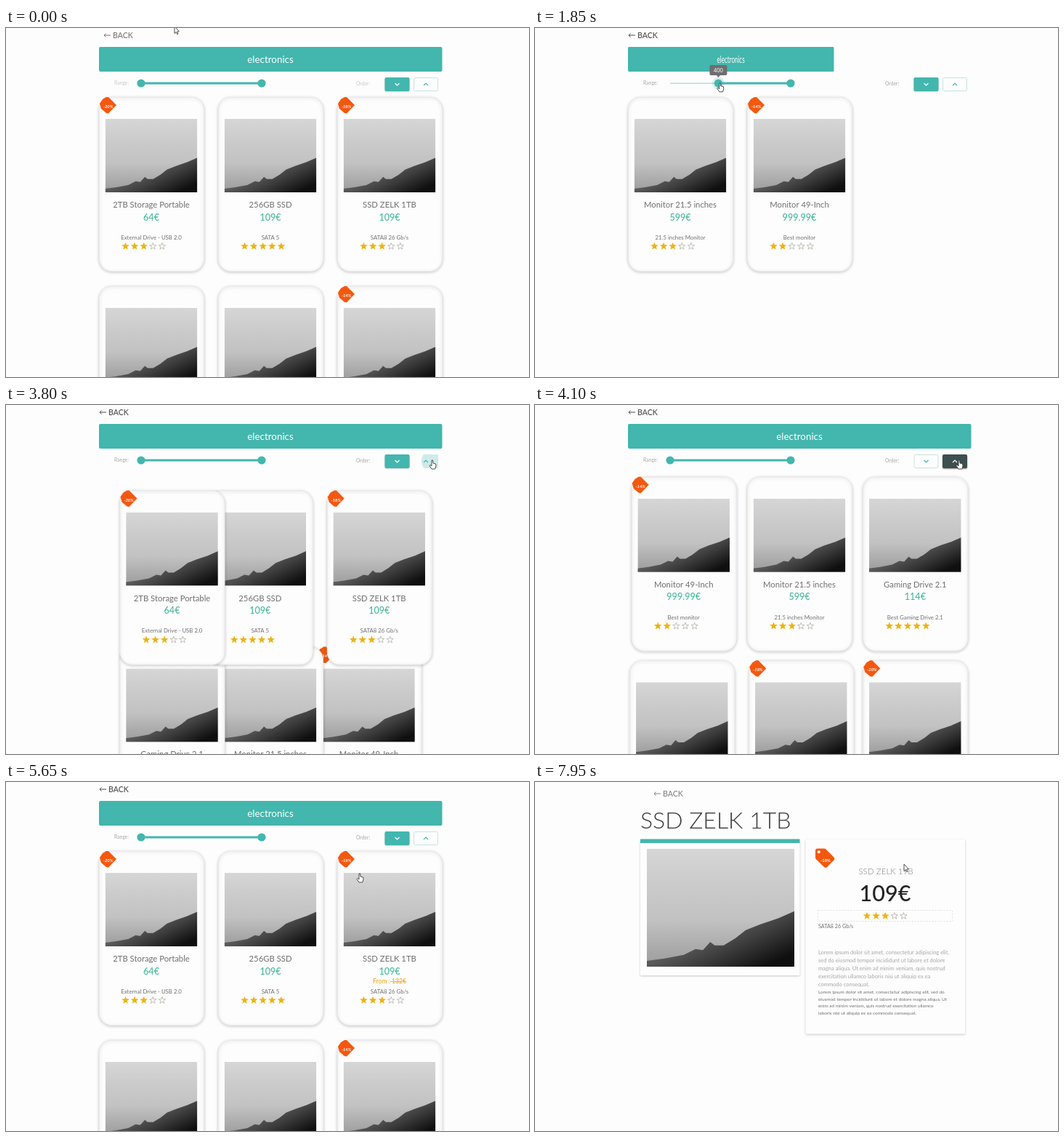
An HTML page with a canvas for the animation above (8 s loop, 720 by 480 pixels).

```html
<!DOCTYPE html>
<html lang="en">
<head>
<meta charset="utf-8">
<title>Shop list</title>
<style>
html, body { margin: 0; width: 100%; height: 100%; overflow: hidden; background: #fdfdfd; }
canvas { display: block; width: 720px; height: 480px; }
</style>
</head>
<body>
<canvas id="stage" width="720" height="480"></canvas>
<script>
const ctx = document.getElementById('stage').getContext('2d');
const LOOP = 8000;
const FONT = 'Lato, "Open Sans", sans-serif';
const BG = '#fdfdfd', TEAL = '#43b6ae', GREEN = '#45b99a', GOLD = '#edb313', ORANGE = '#f4580f';
const GREY = '#707070', DARK = '#4c4c4c', PALE = '#a6a6a6';

const items = {
  drive: { name: '2TB Storage Portable', price: '64€', note: 'External Drive - USB 2.0', stars: 3, off: '-20%' },
  ssd: { name: '256GB SSD', price: '109€', note: 'SATA 5', stars: 5 },
  plus: { name: 'SSD ZELK 1TB', price: '109€', note: 'SATA8 26 Gb/s', stars: 3, off: '-18%' },
  gaming: { name: 'Gaming Drive 2.1', price: '114€', note: 'Best Gaming Drive 2.1', stars: 5 },
  small: { name: 'Monitor 21.5 inches', price: '599€', note: '21.5 inches Monitor', stars: 3 },
  wide: { name: 'Monitor 49-Inch', price: '999.99€', note: 'Best monitor', stars: 2, off: '-14%' }
};
const rising = ['drive', 'ssd', 'plus', 'gaming', 'small', 'wide'];
const falling = ['wide', 'small', 'gaming', 'ssd', 'plus', 'drive'];
const phases = [
  { at: -1000, list: rising },
  { at: 1128, list: ['small', 'wide'] },
  { at: 2660, list: rising },
  { at: 3729, list: falling },
  { at: 4950, list: rising }
];

// Pointer tip: time, x, y
const route = [
  [0, 232, -2], [200, 228, 8], [650, 186, 72], [820, 186, 74], [1080, 255, 77], [1250, 257, 78], [2150, 254, 75],
  [2300, 252, 74], [2570, 182, 72], [2800, 181, 72], [3450, 576, 75], [3700, 587, 76], [3800, 587, 76],
  [4100, 584, 76], [4500, 580, 76], [4750, 540, 76], [5000, 539, 77], [5550, 488, 122], [5650, 487, 126],
  [6250, 487, 128], [7100, 496, 122], [7950, 508, 113]
];

const clamp = v => Math.max(0, Math.min(1, v));
const mix = (a, b, p) => a + (b - a) * p;
const ramp = (t, from, to) => clamp((t - from) / (to - from));
const smooth = p => p * p * (3 - 2 * p);

// cubic-bezier(.4, 0, .1, 1)
function ease(x) {
  let lo = 0, hi = 1;
  for (let i = 0; i < 24; i++) {
    const s = (lo + hi) / 2, r = 1 - s;
    if (1.2 * r * r * s + 0.3 * r * s * s + s * s * s < x) lo = s; else hi = s;
  }
  return smooth(lo);
}

function pointer(t) {
  let i = 0;
  while (i < route.length - 2 && route[i + 1][0] < t) i++;
  const [t0, x0, y0] = route[i], [t1, x1, y1] = route[i + 1];
  const p = smooth(ramp(t, t0, t1));
  return [mix(x0, x1, p), mix(y0, y1, p)];
}

function text(str, x, y, size, color, { weight = 400, align = 'center', style = '' } = {}) {
  ctx.font = `${style} ${weight} ${size}px ${FONT}`;
  ctx.textAlign = align;
  ctx.textBaseline = 'alphabetic';
  ctx.fillStyle = color;
  ctx.fillText(str, x, y + size * 0.36);
}

function box(x, y, w, h, r, fill, stroke) {
  ctx.beginPath();
  ctx.roundRect(x, y, w, h, r);
  if (fill) { ctx.fillStyle = fill; ctx.fill(); }
  if (stroke) { ctx.strokeStyle = stroke; ctx.lineWidth = 1; ctx.stroke(); }
}

function shadowed(color, blur, dy, draw) {
  ctx.save();
  ctx.shadowColor = color;
  ctx.shadowBlur = blur;
  ctx.shadowOffsetY = dy;
  draw();
  ctx.restore();
}

function dot(x, y, r, fill) {
  ctx.beginPath();
  ctx.arc(x, y, r, 0, Math.PI * 2);
  ctx.fillStyle = fill;
  ctx.fill();
}

function poly(points) {
  ctx.beginPath();
  points.forEach(([x, y]) => ctx.lineTo(x, y));
  ctx.closePath();
}

function stars(x, y, count) {
  for (let i = 0; i < 5; i++) {
    const pts = [], full = i < count;
    for (let k = 0; k < 10; k++) {
      const a = k * Math.PI / 5 - Math.PI / 2;
      const r = k % 2 ? (full ? 2.4 : 2) : (full ? 5.6 : 4.9);
      pts.push([x + i * 12.6 + r * Math.cos(a), y + 0.3 + r * Math.sin(a)]);
    }
    poly(pts);
    if (full) {
      ctx.fillStyle = GOLD;
      ctx.fill();
    } else {
      ctx.strokeStyle = '#b4b0a6';
      ctx.lineWidth = 0.8;
      ctx.stroke();
    }
  }
}

const ridge = [[0, .95], [.12, .93], [.25, .9], [.33, .85], [.38, .86], [.43, .79], [.46, .82], [.52, .82],
  [.6, .76], [.67, .69], [.77, .64], [.89, .59], [1, .53], [1, 1], [0, 1]];

function photo(x, y, w, h) {
  ctx.save();
  ctx.beginPath();
  ctx.rect(x, y, w, h);
  ctx.clip();
  const sky = ctx.createLinearGradient(x, y, x, y + h);
  sky.addColorStop(0, '#d6d6d6');
  sky.addColorStop(.3, '#cbcbcb');
  sky.addColorStop(.6, '#c2c2c2');
  sky.addColorStop(.95, '#a0a0a0');
  ctx.fillStyle = sky;
  ctx.fillRect(x, y, w, h);
  const land = ctx.createLinearGradient(x + w * .65, y + h * .6, x + w * .8, y + h);
  land.addColorStop(0, '#5a5a5a');
  land.addColorStop(.45, '#3a3a3a');
  land.addColorStop(1, '#0f0f0f');
  poly(ridge.map(([u, v]) => [x + u * w, y + v * h]));
  ctx.fillStyle = land;
  ctx.fill();
  ctx.restore();
}

function badge(x, y, label) {
  poly([[10, 0], [13, 0], [24, 11], [13, 22.5], [10, 22], [3, 16], [1, 9], [5, 3]].map(([a, b]) => [x + a, y + b]));
  ctx.fillStyle = ORANGE;
  ctx.fill();
  text(label, x + 12.5, y + 13, 5.8, '#fff', { weight: 700, style: 'italic' });
}

function card(item, x, y, hover) {
  shadowed('rgba(0,0,0,.2)', 4, 1, () => box(x + .5, y + .5, 144, 239, 17, BG, '#ebebee'));
  photo(x + 8.7, y + 30, 126.6, 101);
  if (item.off) badge(x, y, item.off);
  const mid = x + 72;
  text(item.name, mid, y + 148, 11.3, GREY);
  text(item.price, mid, y + 165, 12.6, GREEN, { weight: 500 });
  if (hover) {
    text('From : 132€', mid, y + 179, 8.6, '#eba52f', { weight: 500 });
    ctx.fillRect(mid + 1, y + 179, 22, .8);
  }
  text(item.note, mid, y + 193, 7.8, GREY);
  stars(x + 36.5, y + 205, item.stars);
}

function cards(t) {
  let k = phases.length - 1;
  while (phases[k].at > t) k--;
  const now = phases[k], before = k ? phases[k - 1].list : now.list;
  const p = ease(clamp((t - now.at) / 450));
  const slot = i => [128 + 164 * (i % 3), 95 + 260 * Math.floor(i / 3)];
  now.list.forEach((id, i) => {
    const old = before.indexOf(id);
    const a = slot(old < 0 ? i : old), b = slot(i);
    card(items[id], mix(a[0], b[0], p), mix(a[1], b[1], p), id === 'plus' && t > 5480);
  });
}

function back(x, y, color) {
  ctx.strokeStyle = color;
  ctx.lineWidth = 1;
  ctx.beginPath();
  ctx.moveTo(x + 10, y);
  ctx.lineTo(x + 1, y);
  ctx.moveTo(x + 3.5, y - 2.5);
  ctx.lineTo(x + 1, y);
  ctx.lineTo(x + 3.5, y + 2.5);
  ctx.stroke();
  text('BACK', x + 13, y, 10.6, color, { align: 'left', weight: 500 });
}

function header(t) {
  const squeeze = smooth(ramp(t, 650, 900)) - smooth(ramp(t, 2850, 3150));
  ctx.save();
  ctx.translate(128, 0);
  ctx.scale(1 - 0.4 * squeeze, 1);
  box(0, 26, 472.5, 34, 2, TEAL);
  text('electronics', 236, 43, 13.4, '#fff');
  ctx.restore();
}

function slider(t) {
  const value = Math.round(400 * (smooth(ramp(t, 820, 1080)) - smooth(ramp(t, 2300, 2570))));
  const x = 186 + value * 0.166;
  ctx.fillStyle = '#b2dcd8';
  ctx.fillRect(186, 75.3, 166, 1.5);
  ctx.fillStyle = TEAL;
  ctx.fillRect(x, 74.5, 352 - x, 3);
  const active = ramp(t, 650, 750) - ramp(t, 2850, 2980);
  if (active > 0) {
    ctx.globalAlpha = active;
    dot(x, 76, 8.5, 'rgba(67,182,174,.2)');
    const w = value > 99 ? 24 : value > 9 ? 20 : 16;
    box(x - w / 2, 51, w, 14, 2, '#6e6e6e');
    poly([[x - 3, 64.5], [x + 3, 64.5], [x, 68]]);
    ctx.fill();
    text(value, x, 58, 7.4, '#fff');
    ctx.globalAlpha = 1;
  }
  dot(x, 76, 5.6, TEAL);
  dot(352, 76, 5.6, TEAL);
}

function orderButton(x, dir, on, dark, ripple) {
  if (!ripple || on) box(x + .5, 68.5, 33, 18, 2, BG, '#c4e4e0');
  if (on) {
    ctx.globalAlpha = on;
    shadowed(`rgba(0,0,0,${dark ? .4 : .15})`, 2, 1, () => box(x, 68, 34, 19, 2, dark ? '#3d4f4f' : TEAL));
    ctx.globalAlpha = 1;
  }
  if (ripple) {
    ctx.save();
    ctx.beginPath();
    ctx.rect(x, 68, 34, 19);
    ctx.clip();
    dot(x + (dir < 0 ? 26 : 17), 77, ripple, 'rgba(67,182,174,.25)');
    ctx.restore();
  }
  ctx.strokeStyle = on > .5 ? '#fff' : TEAL;
  ctx.lineWidth = 1.2;
  ctx.beginPath();
  ctx.moveTo(x + 14, 77.5 - dir * 1.5);
  ctx.lineTo(x + 17, 77.5 + dir * 1.5);
  ctx.lineTo(x + 20, 77.5 - dir * 1.5);
  ctx.stroke();
}

function filters(t) {
  ctx.globalAlpha = mix(.6, 1, ramp(t, 0, 300));
  text('Range:', 149, 76, 6.8, PALE, { align: 'left' });
  text('Order:', 482, 77, 6.8, PALE, { align: 'left' });
  ctx.globalAlpha = 1;
  slider(t);
  const up = ramp(t, 3850, 4000) - ramp(t, 5060, 5200);
  const wave = at => t > at && t < at + 190 ? 24 * Math.sqrt((t - at) / 190) : 0;
  orderButton(521.5, 1, 1 - up, false, wave(4920));
  orderButton(561, -1, up, t < 5060, wave(3725));
}

function listPage(t) {
  const enter = smooth(ramp(t, 0, 250));
  ctx.globalAlpha = mix(.75, 1, enter);
  back(mix(134, 128, enter), 10, DARK);
  ctx.globalAlpha = 1;
  header(t);
  filters(t);
  cards(t);
}

function tag(x, y) {
  ctx.beginPath();
  ctx.moveTo(x + 3, y);
  ctx.lineTo(x + 12, y);
  ctx.quadraticCurveTo(x + 13.5, y, x + 14.7, y + 1.2);
  ctx.lineTo(x + 25.5, y + 12);
  ctx.quadraticCurveTo(x + 27, y + 14, x + 25.5, y + 16);
  ctx.lineTo(x + 16, y + 25.5);
  ctx.quadraticCurveTo(x + 14, y + 27, x + 12, y + 25.5);
  ctx.lineTo(x + 1, y + 14.7);
  ctx.quadraticCurveTo(x, y + 13.5, x, y + 12);
  ctx.lineTo(x, y + 3);
  ctx.quadraticCurveTo(x, y, x + 3, y);
  ctx.fillStyle = ORANGE;
  ctx.fill();
  dot(x + 4.7, y + 4.7, 2, BG);
  text('-18%', x + 14, y + 16.5, 5.8, '#fff', { weight: 700 });
}

const intro = ['Lorem ipsum dolor sit amet, consectetur adipiscing elit,',
  'sed do eiusmod tempor incididunt ut labore et dolore', 'magna aliqua. Ut enim ad minim veniam, quis nostrud',
  'exercitation ullamco laboris nisi ut aliquip ex ea', 'commodo consequat.'];
const detail = ['Lorem ipsum dolor sit amet, consectetur adipiscing elit, sed do',
  'eiusmod tempor incididunt ut labore et dolore magna aliqua. Ut',
  'enim ad minim veniam, quis nostrud exercitation ullamco',
  'laboris nisi ut aliquip ex ea commodo consequat.'];

function detailPage() {
  const item = items.plus;
  back(163, 16, '#858585');
  text(item.name, 145, 52, 32, '#3a3a3a', { weight: 300, align: 'left' });
  const panel = (x, h) => shadowed('rgba(0,0,0,.22)', 3, 1, () => box(x, 79, 219.5, h, 1, BG));
  panel(145, 187);
  panel(372.5, 267.5);
  ctx.fillStyle = TEAL;
  ctx.fillRect(145, 78.5, 219.5, 5.5);
  photo(154, 92, 203, 162);
  tag(386, 91.5);
  text(item.name, 483, 123, 11.6, '#808080', { weight: 300 });
  text(item.price, 482, 153.5, 30.5, '#242424', { weight: 500 });
  ctx.setLineDash([2, 2]);
  box(389.5, 176.5, 185, 15, 1, null, '#dedede');
  ctx.setLineDash([]);
  stars(457, 184, item.stars);
  text(item.note, 390, 198, 7.2, GREY, { align: 'left' });
  intro.forEach((s, i) => text(s, 390, 234.5 + 11 * i, 7.5, PALE, { align: 'left' }));
  detail.forEach((s, i) => text(s, 390, 289 + 9.4 * i, 6.4, GREY, { align: 'left' }));
}

function cursor(t) {
  const [x, y] = pointer(t);
  const hand = (t > 620 && t < 2900) || (t > 3420 && t < 6350);
  ctx.save();
  ctx.translate(x, y);
  ctx.lineWidth = .9;
  ctx.strokeStyle = '#3c3c3c';
  ctx.fillStyle = '#fff';
  if (hand) {
    poly([[-1, 0], [.7, 0], [1, 4], [4.6, 5], [5, 8], [3.8, 12], [-1, 12], [-4, 7.5], [-3, 6.3], [-1, 8]]);
  } else {
    poly([[0, 0], [0, 9.5], [2.2, 7.6], [3.7, 10.7], [5, 10], [3.7, 7], [6.3, 6.7]]);
  }
  ctx.fill();
  ctx.stroke();
  ctx.restore();
}

// Draws a page shifted sideways and blended into the background.
function moved(dx, veil, draw) {
  ctx.save();
  ctx.translate(dx, 0);
  draw();
  ctx.restore();
  if (veil > 0) {
    ctx.globalAlpha = veil;
    ctx.fillStyle = BG;
    ctx.fillRect(0, 0, 720, 480);
    ctx.globalAlpha = 1;
  }
}

function drawAt(t) {
  ctx.fillStyle = BG;
  ctx.fillRect(0, 0, 720, 480);
  if (t < 6450) {
    const out = smooth(ramp(t, 6200, 6450));
    moved(55 * out, out, () => listPage(t));
  } else {
    const hidden = 1 - smooth(ramp(t, 6450, 6850));
    moved(55 * hidden, hidden, detailPage);
  }
  cursor(t);
}

const start = performance.now();
function loop() {
  drawAt((performance.now() - start) % LOOP);
  requestAnimationFrame(loop);
}
loop();
</script>
</body>
</html>
```
